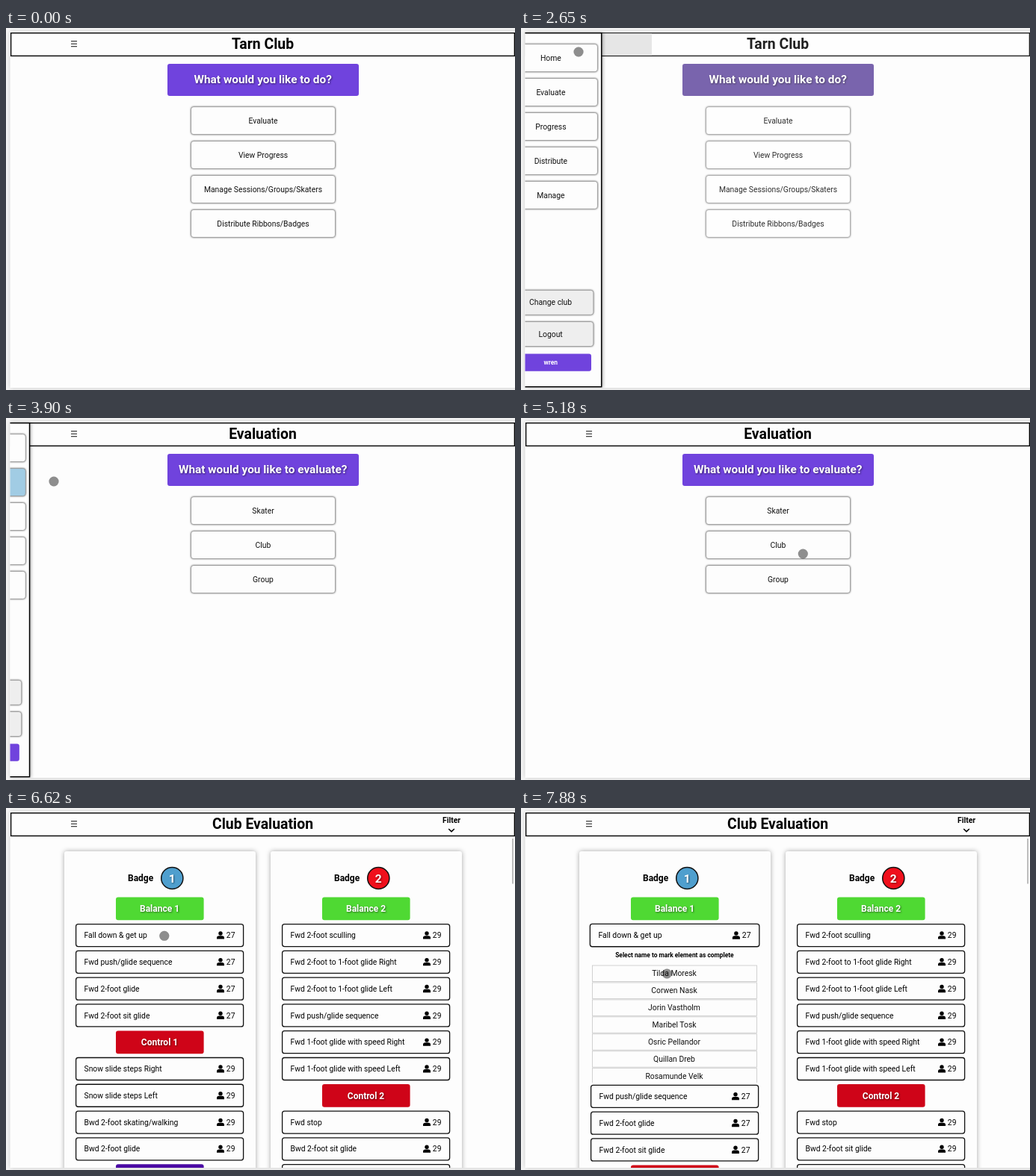
An HTML page for the animation above (8000 ms loop, 681 by 485 pixels).

```html
<!DOCTYPE html>
<html lang="en">
<head>
<meta charset="utf-8">
<title>Skating evaluation</title>
<style>
  html, body { margin: 0; width: 100%; height: 100%; overflow: hidden; background: #f6f6f6; }
  svg { display: block; width: 681px; height: 485px; font-family: Roboto, Arial, sans-serif; }
  .soft { filter: drop-shadow(0 0 1.3px rgba(0,0,0,.5)); }
  .cast { filter: drop-shadow(1px 1px 1px rgba(0,0,0,.5)); }
  .card { filter: drop-shadow(0 0 3px rgba(0,0,0,.35)); }
  .window { filter: drop-shadow(0 0 3px rgba(0,0,0,.18)); }
  .side { filter: drop-shadow(1px 0 2px rgba(0,0,0,.35)); }
</style>
</head>
<body>
<svg id="stage" viewBox="0 0 681 485"></svg>
<script>
const LOOP = 8000, PAPER = '#fdfdfd', PURPLE = '#7043dd';
const PITCH = 35.78, FIRST = 134.8, DROP = 180;

const rect = (x, y, w, h, fill, more = '') =>
  `<rect x="${x}" y="${y}" width="${w}" height="${h}" fill="${fill}" ${more}/>`;

// Text is centred vertically on its capitals.
const text = (s, x, cy, size, { bold, fill = '#111', anchor = 'middle', cls = '' } = {}) =>
  `<text x="${x}" y="${cy + size * 0.355}" font-size="${size}" font-weight="${bold ? 700 : 400}"
    fill="${fill}" text-anchor="${anchor}" class="${cls}">${s}</text>`;

const white = { bold: true, fill: '#fff', cls: 'cast' };

const button = (label, x, y, w, h = 37, fill = PAPER, id = '') =>
  rect(x, y, w, h, fill, `rx="3.5" stroke="#999" stroke-width=".9" class="soft" id="${id}"`) +
  text(label, x + w / 2, y + h / 2, 10.35);

const header = title =>
  rect(6.6, 6.7, 673.8, 30.7, PAPER, 'stroke="#000" stroke-width="1.4"') +
  '<path d="M87 17.7h8M87 21.2h8M87 24.7h8" stroke="#111" stroke-width="1.1"/>' +
  text(title, 343.5, 21, 19.4, { bold: true, fill: '#000' });

const choicePage = (title, question, choices) =>
  header(title) +
  rect(216, 48, 256, 43, PURPLE, 'rx="3"') +
  text(question, 343.7, 68.8, 15.4, white) +
  choices.map((c, i) => button(c, 247.5, 105.6 + i * 45.95, 193)).join('');

const person = (x, cy) =>
  `<g fill="#000"><circle cx="${x + 5}" cy="${cy - 2.6}" r="2.7"/>
   <path d="M${x} ${cy + 5}v-1.6q0-2.8 3-2.8h4q3 0 3 2.8v1.6z"/></g>`;

const row = (label, count, cy) =>
  rect(93.6, cy - 15, 224, 30, PAPER, 'rx="3" stroke="#111" stroke-width="1.3"') +
  text(label, 104.5, cy, 10.35, { anchor: 'start', fill: '#000' }) +
  person(282, cy) +
  text(count, 306.5, cy, 10.35, { anchor: 'end', fill: '#000' });

const category = (label, fill, cy) =>
  rect(147, cy - 15.3, 117.6, 30.8, fill, 'rx="3"') + text(label, 205.5, cy, 12, white);

const at = i => FIRST + i * PITCH;

// A string is a row; a pair is a coloured category.
const entries = (list, count, from = 0) => list.map((e, k) => {
  const i = k + from;
  return Array.isArray(e) ? category(e[0], e[1], at(i)) : row(e, count(i), at(i));
}).join('');

const cardTop = (number, fill) =>
  rect(78, 58, 256, 480, PAPER, 'rx="3" class="card"') +
  text('Badge', 163, 94, 12, { bold: true, fill: '#000', anchor: 'start' }) +
  `<circle cx="222.3" cy="94" r="14.6" fill="${fill}" stroke="#111" stroke-width="1.5"/>` +
  text(number, 222.3, 94, 15.5, white);

const GREEN = '#4fd933', RED = '#cf0418', VIOLET = '#4a0aa4';
const left = ['Fwd push/glide sequence', 'Fwd 2-foot glide', 'Fwd 2-foot sit glide',
  ['Control 1', RED], 'Snow slide steps Right', 'Snow slide steps Left',
  'Bwd 2-foot skating/walking', 'Bwd 2-foot glide', ['Agility 1', VIOLET]];
const right = [['Balance 2', GREEN], 'Fwd 2-foot sculling', 'Fwd 2-foot to 1-foot glide Right',
  'Fwd 2-foot to 1-foot glide Left', 'Fwd push/glide sequence',
  'Fwd 1-foot glide with speed Right', 'Fwd 1-foot glide with speed Left',
  ['Control 2', RED], 'Fwd stop', 'Bwd 2-foot sit glide', 'Bwd 2-foot glide'];
const skaters = ['Tilda Moresk', 'Corwen Nask', 'Jorin Vastholm', 'Maribel Tosk',
  'Osric Pellandor', 'Quillan Dreb', 'Rosamunde Velk'];

const nameList =
  text('Select name to mark element as complete', 205.4, 197.3, 8.4, { bold: true, fill: '#000' }) +
  '<g clip-path="url(#names)">' + skaters.map((s, i) => {
    const y = 211 + i * 22.95;
    return rect(95.5, y, 220, 21.4, PAPER, 'stroke="#c6c6c6" stroke-width=".8"') +
      text(s, 205, y + 10.8, 10.35);
  }).join('') + '</g>';

const clubPage =
  '<g clip-path="url(#body)">' +
    cardTop(1, '#4f9fce') + category('Balance 1', GREEN, at(0)) +
    `<g id="firstRow">${row('Fall down &amp; get up', 27, at(1))}</g>` +
    `<g id="nameList">${nameList}</g>` +
    `<g id="rest">${entries(left, i => i < 5 ? 27 : 29, 2)}</g>` +
    `<g transform="translate(276 0)">${cardTop(2, '#f0101c')}${entries(right, () => 29)}</g>` +
  '</g>' + header('Club Evaluation') +
  text('Filter', 596, 16.5, 10.35, { bold: true, fill: '#000' }) +
  '<path d="M592.2 28l3.8 3.6 3.8-3.6" fill="none" stroke="#000" stroke-width="1.5"/>' +
  rect(677, 41, 2, 60.5, '#bdbdbd');

const menu =
  rect(6.7, 6.7, 135, 474, PAPER, 'stroke="#000" stroke-width="1.5" class="side"') +
  ['Home', 'Evaluate', 'Progress', 'Distribute', 'Manage'].map((s, i) =>
    button(s, 11.4, 21.6 + i * 45.95, 125, 37, PAPER, 'item' + i)).join('') +
  button('Change club', 16.3, 351.3, 114.6, 33, '#eee') +
  button('Logout', 16.3, 393.5, 114.6, 33, '#eee') +
  rect(20, 436.5, 108, 23.3, PURPLE, 'rx="3"') +
  text('wren', 73.8, 447.7, 8.4, { bold: true, fill: '#fff' });

const stage = document.getElementById('stage');
stage.innerHTML = `
  <defs>
    <clipPath id="win"><rect x="5.5" y="5" width="676" height="477"/></clipPath>
    <clipPath id="body"><rect x="6" y="38" width="675" height="444"/></clipPath>
    <clipPath id="names"><rect x="90" y="205" width="230" height="163"/></clipPath>
  </defs>
  ${rect(0, 0, 681, 485, '#f6f6f6')}
  ${rect(5.5, 5, 690, 477, PAPER, 'class="window"')}
  <g clip-path="url(#win)">
    <g id="home">
      ${choicePage('Tarn Club', 'What would you like to do?', ['Evaluate', 'View Progress',
        'Manage Sessions/Groups/Skaters', 'Distribute Ribbons/Badges'])}
      ${rect(7.5, 7.5, 167.5, 29, '#e2e2e2', 'id="hover"')}
    </g>
    <g id="choose">${choicePage('Evaluation', 'What would you like to evaluate?',
      ['Skater', 'Club', 'Group'])}</g>
    <g id="club">${clubPage}</g>
    <g id="menu">${menu}</g>
  </g>
  <circle id="cursor" r="6.5" fill="#000" fill-opacity=".44" stroke="#000" stroke-opacity=".12" stroke-width=".6"/>`;

const $ = id => document.getElementById(id);
const show = (id, on) => $(id).setAttribute('display', on ? 'inline' : 'none');

// Progress from 1/n at time a to 1 at time b, in n held steps.
const stepped = (t, a, b, n) =>
  t < a ? 0 : Math.min(1, (Math.floor((t - a) / ((b - a) / (n - 1)) + 1e-6) + 1) / n);
const easeOut = p => 1 - (1 - p) ** 2;
const easeBoth = p => p * p * (3 - 2 * p);

const bezier = (pts, u) => pts.length === 1 ? pts[0] :
  bezier(pts.slice(1).map((q, i) => q.map((v, k) => pts[i][k] + (v - pts[i][k]) * u)), u);

// Each move: start, end, steps, easing, control points.
const moves = [
  [417, 610, 3, easeOut, [[444, 427], [400, 350], [350, 299]]],
  [1700, 2460, 9, easeOut, [[350, 299], [215, 210], [77, 32]]],
  [3230, 3610, 5, easeBoth, [[77, 32], [73, 62], [64, 85]]],
  [3990, 4670, 8, easeBoth, [[64, 85], [230, 125], [377.5, 185.5]]],
  [4870, 4970, 1, easeOut, [[377.5, 185.5], [377.5, 183.3]]],
  [5180, 5280, 1, easeOut, [[377.5, 183.3], [377.3, 182]]],
  [5760, 6520, 9, easeOut, [[377.3, 182], [450, 240], [330, 270], [220, 172]]],
  [6620, 6720, 1, easeOut, [[220, 172], [211.8, 171.3]]],
  [7300, 7880, 7, easeOut, [[211.8, 171.3], [360, 185], [325, 285], [195.3, 222]]]
];

function cursorAt(t) {
  const [a, b, n, ease, pts] = moves.filter(m => m[0] <= t).pop() || moves[0];
  const p = n === 1 ? (t < a ? 0 : 1) : stepped(t, a, b, n);
  return bezier(pts, ease(p));
}

function draw(t) {
  const open = t >= 7110;
  const slide = t < 3900 ? easeOut(stepped(t, 2560, 2830, 4)) : t < 3990 ? 0.19 : 0;
  const dim = t < 3900 ? slide : 0;

  show('home', t < 3900);
  show('choose', t >= 3900 && t < 5560);
  show('club', t >= 5560);
  show('hover', dim > 0);
  $('home').style.filter = dim
    ? `blur(${0.6 * dim}px) saturate(${1 - 0.61 * dim}) opacity(${1 - 0.17 * dim})` : 'none';

  show('menu', slide > 0);
  $('menu').setAttribute('transform', `translate(${-136 * (1 - slide)} 0)`);
  $('item1').setAttribute('fill', t >= 3900 ? '#a1cce4' : PAPER);

  show('nameList', open);
  $('rest').setAttribute('transform', `translate(0 ${open ? DROP : 0})`);
  const cx = 205.6, cy = at(1);
  $('firstRow').setAttribute('transform',
    open ? `translate(${cx} ${cy}) scale(1.011) translate(${-cx} ${-cy})` : '');

  const [x, y] = cursorAt(t);
  show('cursor', t >= 320);
  $('cursor').setAttribute('cx', x);
  $('cursor').setAttribute('cy', y);
}

const start = performance.now();
function tick() {
  draw((performance.now() - start) % LOOP);
  requestAnimationFrame(tick);
}
tick();
</script>
</body>
</html>
```
